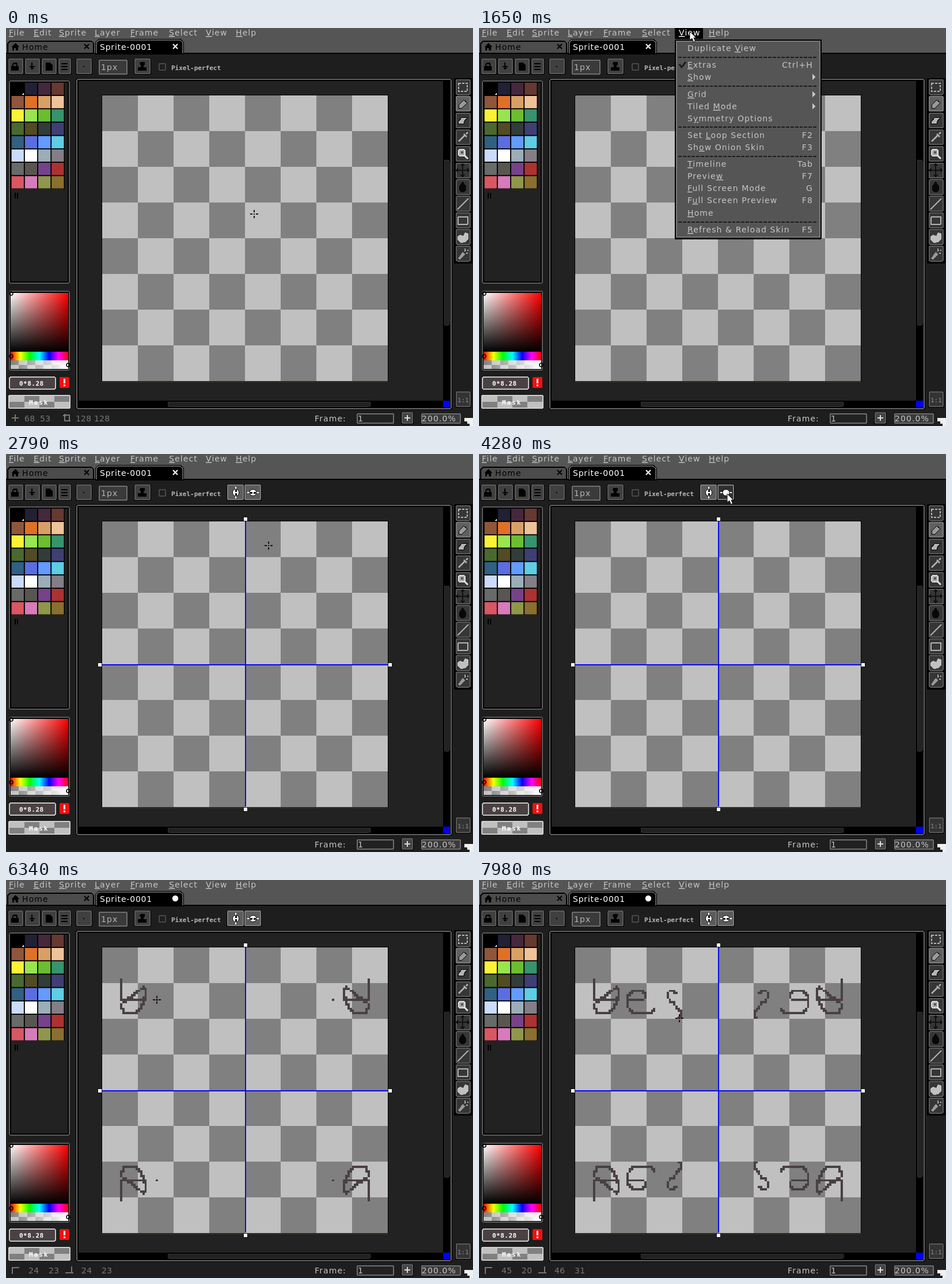
Recreate the animation shown at these times as an HTML page. Size 811x691 px, loop 8000 ms.

```html
<!DOCTYPE html>
<html lang="en">
<head>
<meta charset="utf-8">
<title>Pixel editor: symmetry drawing</title>
<style>
  html, body { margin: 0; width: 100%; height: 100%; overflow: hidden; background: #1e1e1e; }
  svg { display: block; width: 811px; height: 691px; shape-rendering: crispEdges; }
  text { font: 14px "DejaVu Sans", sans-serif; letter-spacing: 1.1px; fill: #c6c6c6; white-space: pre; }
  text.mini { font: bold 11px "DejaVu Sans Mono", monospace; letter-spacing: 0; }
  .smooth { shape-rendering: auto; }
</style>
</head>
<body>
<svg id="stage" viewBox="0 0 811 691">
  <defs>
    <linearGradient id="sat"><stop stop-color="#fff"/><stop offset="1" stop-color="#f00"/></linearGradient>
    <linearGradient id="val" x2="0" y2="1"><stop stop-opacity="0"/><stop offset="1"/></linearGradient>
    <linearGradient id="hue">
      <stop stop-color="#f00"/><stop offset=".167" stop-color="#ff0"/><stop offset=".333" stop-color="#0f0"/>
      <stop offset=".5" stop-color="#0ff"/><stop offset=".667" stop-color="#00f"/>
      <stop offset=".833" stop-color="#f0f"/><stop offset="1" stop-color="#f00"/>
    </linearGradient>
    <linearGradient id="alpha"><stop stop-color="#fff" stop-opacity="0"/><stop offset="1" stop-color="#fff"/></linearGradient>
    <path id="ink"/>
  </defs>
</svg>
<script>
const stage = document.getElementById('stage');
const ink = document.getElementById('ink');
const LOOP = 8000, CELL = 3.871, LEFT = 167, TOP = 117, SIZE = 128;
const LIGHT = '#c0c0c0', DARK = '#808080', EDGE = '#5a5a5a';
let layer = stage;

function el(tag, attrs) {
  const node = document.createElementNS('http://www.w3.org/2000/svg', tag);
  for (const k in attrs) node.setAttribute(k, attrs[k]);
  return layer.appendChild(node);
}
const rect = (x, y, width, height, fill, more) => el('rect', { x, y, width, height, fill, ...more });
const path = (d, stroke, more) => el('path', { d, stroke, fill: 'none', 'stroke-width': 2, ...more });
const shape = (d, fill, more) => el('path', { d, fill, ...more });
const circle = (cx, cy, r, fill, more) => el('circle', { cx, cy, r, fill, class: 'smooth', ...more });
// An underscore marks the mnemonic letter after it.
function label(x, y, str, fill = '#c6c6c6', more) {
  const node = el('text', { x, y, style: `fill:${fill}`, ...more });
  node.innerHTML = str.replace(/_(.)/, '<tspan text-decoration="underline">$1</tspan>');
  return node;
}
const mini = (x, y, str, fill, more) => label(x, y, str, fill, { class: 'mini', ...more });
function group(draw) {
  const parent = layer, g = el('g', {});
  layer = g;
  draw();
  layer = parent;
  return g;
}
const show = (node, on) => node.setAttribute('visibility', on ? 'visible' : 'hidden');
function button(x, y, w, h, face = '#404040', edge = EDGE) {
  rect(x, y, w, h, '#000', { rx: 3 });
  return rect(x + 2, y + 1, w - 4, h - 3, face, { rx: 2, stroke: edge, 'stroke-width': 2 });
}
function panel(x, y, w, h) {
  rect(x, y, w, h, '#222', { rx: 3, stroke: EDGE, 'stroke-width': 2 });
  rect(x + 2, y + 2, w - 4, h - 4, '#222', { stroke: '#000', 'stroke-width': 2 });
}
function checker(x, y, cols, rows, w, h, even = DARK, odd = LIGHT) {
  for (let i = 0; i < cols * rows; i++) {
    const c = i % cols, r = i / cols | 0;
    rect(x + c * w, y + r * h, w, h, (c + r) % 2 ? odd : even);
  }
}
const cross = (x, y, stroke) => path(`M${x - 4} ${y - 4}l8 8m0 -8l-8 8`, stroke, { class: 'smooth' });

// Menu bar and tabs
rect(0, 0, 811, 46, '#555');
rect(0, 43, 811, 648, '#1e1e1e');
path('M0 44H811', '#000');
const viewBox = rect(340, 0, 49, 19, '#000');
const menuBar = ['_File', 5, '_Edit', 48, '_Sprite', 92, '_Layer', 154, '_Frame', 216, '_Select', 283, '_View', 347, '_Help', 399];
let viewLabel;
for (let i = 0; i < menuBar.length; i += 2) {
  const node = label(menuBar[i + 1], 13, menuBar[i]);
  if (menuBar[i] === '_View') viewLabel = node;
}
shape('M2 44V27l4 -5H149l4 5V44z', '#000');
shape('M4 43V27l3 -3H148l3 3V43z', '#4c4c4c');
shape('M155 46V25l5 -6H303l6 6V46z', '#000');
path('M157 44V25l4 -4H302l5 4V44', EDGE);
rect(159, 24, 146, 22, '#000');
shape('M9 33l7 -7l7 7h-2v6h-4v-4h-3v4h-3v-6z', '#000');
label(28, 38, 'Home', '#000');
cross(140, 32, '#000');
label(163, 38, 'Sprite-0001', '#fff', { style: 'fill:#fff;letter-spacing:.8px' });
const closeMark = cross(294, 32, '#fff');
const dirtyMark = circle(294, 32, 5.2, '#fff');

// Context bar
[3, 32, 61, 90].forEach((x, i) => button(x, 53, i < 3 ? 28 : 24, 28));
shape('M9 66h2v-4l2 -2h5l2 2v4h2v8h-13z M13 66h5v-3h-5z', '#000', { 'fill-rule': 'evenodd' });
path('M45 60v12M41 67h9M43 70h5', '#000');
shape('M69 60h7l5 5v9h-12z', '#000');
path('M96 62h11M96 67h11M96 72h11', '#000');
button(121, 53, 29, 28);
rect(134, 66, 2, 2, '#000');
rect(162, 56, 48, 24, '#3a3a3a', { stroke: '#6e6e6e', 'stroke-width': 2, rx: 2 });
label(165, 73, '1px', '#b4b4b4');
button(222, 53, 30, 28);
shape('M233 59h8v4l-2 2v3h5v6h-15v-6h5v-3l-2 -2z', '#000');
const ppHover = rect(261, 52, 114, 31, '#5d3a30');
rect(266, 62, 11, 11, 'none', { stroke: '#484848', 'stroke-width': 2, rx: 2 });
mini(287, 73, 'Pixel-perfect', '#b8b8b8');

const symButtons = group(() => {
  button(383, 53, 31, 28, '#5c5c5c', '#7c7c7c');
  button(413, 53, 31, 28, '#5c5c5c', '#7c7c7c');
});
const symFaces = [symButtons.children[1], symButtons.children[3]];
layer = symButtons;
// Lens with an axis; the slot hides while the button is hovered.
function symIcon(cx, turn) {
  let slot;
  const icon = group(() => {
    path('M-10 0H10', '#fff');
    el('ellipse', { rx: 6, ry: 5.5, fill: '#fff', stroke: '#000', class: 'smooth' });
    slot = path('M-5 0H5', '#111', { 'stroke-width': 3, 'stroke-dasharray': '4 2' });
  });
  icon.setAttribute('transform', `translate(${cx} 67) rotate(${turn})`);
  return slot;
}
const slots = [symIcon(399, 90), symIcon(429, 0)];
layer = stage;

// Palette
panel(6, 92, 104, 351);
const palette = ('000000 222034 45283c 663931 8f563b df7126 d9a066 eec39a fbf236 99e550 6abe30 37946e ' +
  '4b692f 524b24 323c39 3f3f74 306082 5b6ee1 639bff 5fcde4 cbdbfc ffffff 9badb7 847e87 ' +
  '696a6a 595652 76428a ac3232 d95763 d77bba 8f974a 8a6f30').split(' ');
rect(8, 94, 94, 185, '#000');
palette.forEach((c, i) => rect(9.6 + i % 4 * 23.2, 94.8 + (i >> 2) * 23.2, 21.3, 21.3, '#' + c, { class: 'smooth' }));
shape('M31 112v4h-4z', '#fff');
path('M16 286v10M20 286v10', '#000');

// Colour picker
panel(6, 457, 104, 137);
rect(8, 460, 100, 102, 'url(#sat)');
rect(8, 460, 100, 102, 'url(#val)');
rect(8, 562, 100, 15, 'url(#hue)');
checker(8, 577, 7, 2, 14.28, 7.5);
rect(8, 577, 100, 15, 'url(#alpha)');
for (const [x, y] of [[9, 461], [9, 570], [108, 585]])
  circle(x, y, 3, 'none', { stroke: '#000', 'stroke-width': 1.5 });
rect(6, 606, 80, 21, '#4a4143', { rx: 3, stroke: '#c6c6c6', 'stroke-width': 2 });
mini(23, 621, '0*8.28', '#fff', { style: 'fill:#fff;letter-spacing:.5px' });
rect(93, 606, 17, 19, '#f01010', { rx: 3 });
path('M101.5 609v8M101.5 619v3', '#fff', { 'stroke-width': 3 });
rect(4, 637, 108, 24, LIGHT, { rx: 3 });
checker(6, 639, 4, 2, 26, 10, LIGHT, DARK);
rect(5, 638, 106, 22, 'none', { rx: 3, stroke: '#d0d0d0', 'stroke-width': 2 });
mini(40, 654, 'Mask', '#fff', { style: 'fill:#fff;letter-spacing:2px' });

// Editor
rect(121, 87, 654, 576, '#000', { rx: 4 });
rect(123, 89, 650, 572, '#222', { rx: 3, stroke: '#666', 'stroke-width': 2 });
rect(125, 91, 646, 568, '#222', { stroke: '#000', 'stroke-width': 2 });
rect(759, 92, 13, 555, '#000');
rect(125, 647, 634, 12, '#000');
rect(761, 229, 9, 287, '#222', { rx: 3, stroke: '#333' });
rect(281, 649, 352, 8, '#222', { rx: 3, stroke: '#333' });
rect(759, 647, 12, 11, '#00f');
rect(LEFT - 1, TOP - 1, 498, 497, '#000');
path('M167 614.5H663', '#383828', { 'stroke-width': 1 });
checker(LEFT, TOP, 8, 8, 61.94, 61.94);
for (const [sx, sy] of [[1, 1], [-1, 1], [1, -1], [-1, -1]])
  el('use', {
    href: '#ink', fill: '#484042',
    transform: `translate(${LEFT} ${TOP}) scale(${CELL}) translate(${sx < 0 ? SIZE : 0} ${sy < 0 ? SIZE : 0}) scale(${sx} ${sy})`
  });

function handle(x, y) {
  rect(x - 4, y - 4, 8, 8, '#111');
  rect(x - 3, y - 3, 6, 6, '#fff');
}
const axisV = group(() => { rect(415, 117, 2, 495, '#0808f0'); handle(416, 113); handle(416, 617); });
const axisH = group(() => { rect(167, 365, 496, 2, '#0808f0'); handle(163, 366); handle(667, 366); });

// Tool column
rect(778, 87, 32, 322, '#000', { rx: 3 });
for (let i = 0; i < 11; i++) button(780, 89 + i * 28.9, 28, 28.5, i === 1 ? '#606060' : '#363636', i === 1 ? '#7a7a7a' : EDGE);
const GREY = '#b4b4b4';
rect(786, 96, 15, 14, 'none', { stroke: GREY, 'stroke-width': 2, 'stroke-dasharray': '4 2' });
shape('M786 139v-5l9 -9l6 5l-9 9z', '#999', { stroke: '#000' });
shape('M785 163l7 -8h10l-7 8v3h-10z', GREY, { stroke: '#000' });
path('M786 197l10 -10m-1 -3l5 5m-1 -5l3 -3', GREY, { class: 'smooth', 'stroke-width': 2.5 });
rect(786, 211, 11, 11, '#aaa', { rx: 3, stroke: '#e0e0e0', 'stroke-width': 2 });
rect(790, 214, 4, 4, '#555');
path('M796 221l6 6', '#e0e0e0', { class: 'smooth', 'stroke-width': 3 });
path('M793 236v22M782 247h22M790 239l3 -3l3 3M790 255l3 3l3 -3M785 244l-3 3l3 3M801 244l3 3l-3 3', '#111');
shape('M793 266l6 9v6l-3 4h-6l-3 -4v-6z', '#080808');
path('M784 315L803 296', GREY, { class: 'smooth' });
rect(785, 328, 17, 13, 'none', { stroke: GREY, 'stroke-width': 2, rx: 1 });
shape('M784 362l5 -3l5 2l3 -6l6 2v9l-5 6l-9 1l-5 -5z', LIGHT);
shape('M785 400l8 -11l4 4l-9 9z', '#999');
path('M796 388l2 -2M799 391h3M797 383v2M801 386h2', GREY);
button(780, 631, 28, 28, '#333');
mini(784, 650, '1:1', '#707070');

// Status bar
label(536, 683, 'Frame:');
rect(610, 670, 63, 16, '#222', { stroke: '#6e6e6e', 'stroke-width': 2, rx: 2 });
label(611, 683, '1');
button(686, 667, 22, 21, '#444');
path('M697 672v10M692 677h10', '#ddd');
rect(722, 670, 67, 16, '#3a3a3a', { stroke: '#6e6e6e', 'stroke-width': 2, rx: 2 });
label(722, 683, '200.0%');
shape('M796 677h15v14h-6v-4h-4v-4h-5z', '#f0f0f0');
const GRAY = '#777';
const hoverStatus = group(() => {
  path('M16 671v12M10 677h12', GRAY);
  path('M102 671v11h10M99 674l3 -3l3 3M104 672h6v10', GRAY);
  label(121, 683, '128', GRAY, { style: `fill:${GRAY};letter-spacing:.2px` });
  label(153, 683, '128', GRAY, { style: `fill:${GRAY};letter-spacing:.2px` });
});
const dragStatus = group(() => {
  path('M10 673h13M11 672v12', GRAY);
  path('M103 682h14M114 671v12', GRAY);
});
const coords = [0, 1, 2, 3].map(() => label(0, 683, '', GRAY, { style: `fill:${GRAY};letter-spacing:.4px` }));

// Popup menu: text, centre line, shortcut (> opens a submenu)
const items = [
  ['Duplicate _View', 35], ['_Extras', 64, 'Ctrl+H'], ['_Show', 85, '>'], ['_Grid', 115, '>'],
  ['Tiled _Mode', 136, '>'], ['S_ymmetry Options', 157], ['Set _Loop Section', 186, 'F2'],
  ['Sh_ow Onion Skin', 207, 'F3'], ['_Timeline', 236, 'Tab'], ['Previe_w', 257, 'F7'],
  ['_Full Screen Mode', 278, 'G'], ['F_ull Screen Preview', 299, 'F8'], ['_Home', 321],
  ['_Refresh &amp; Reload Skin', 350, 'F5']
];
let rows;
const popup = group(() => {
  rect(340, 20, 255, 347, '#000', { rx: 2 });
  rect(343, 23, 249, 340, '#555', { stroke: '#787878', 'stroke-width': 2 });
  for (const y of [51, 101, 172, 223, 337]) path(`M346 ${y}H588`, '#1c1c1c', { 'stroke-dasharray': '5.8 2' });
  rows = items.map(([name, y, key]) => {
    const back = rect(345, y - 10, 244, 21, '#1e1e1e');
    const texts = [label(362, y + 5, name)];
    if (key === '>') shape(`M579 ${y - 5}l6 5l-6 5z`, '#c6c6c6');
    else if (key) texts.push(label(580, y + 5, key, '#c6c6c6', { 'text-anchor': 'end' }));
    return { y, back, texts };
  });
  path('M348 63l4 5l7 -9', '#1c1c1c', { 'stroke-width': 3 });
});

// Pointers
const arrow = shape('M0 0V15L4 12L6.5 18.5L9.5 17L7 11H11Z', '#fff', { stroke: '#111', class: 'smooth' });
const aim = shape('M-7 -1h4v2h-4zM3 -1h4v2h-4zM-1 -7h2v4h-2zM-1 3h2v4h-2zM-1 -1h2v2h-2z', '#141414');

// Pointer path: time, x, y
const approach = [
  [0, 431, 323], [550, 431, 323], [740, 372, 180], [960, 294, 49], [1120, 322, 24], [1290, 366, 6],
  [1650, 366, 6], [1790, 392, 105], [1930, 421, 230], [2000, 421, 230], [2090, 427, 234], [2380, 456, 159],
  [2910, 456, 159], [3260, 440, 118], [3590, 399, 68], [3900, 399, 69], [4060, 430, 69], [4280, 431, 69],
  [4430, 431, 69], [4780, 305, 125], [5090, 201, 174]
];
const letterY = [
  [5150, 201, 174], [5240, 201, 187], [5360, 201, 206], [5450, 208, 208], [5540, 224, 198], [5620, 240, 186],
  [5700, 240, 207], [5760, 234, 221], [5810, 224, 231], [5870, 209, 232], [5920, 201, 223], [5960, 202, 214],
  [5990, 212, 209], [6030, 242, 209], [6080, 242, 209]
];
const letterE = [
  [6310, 261.8, 208], [6400, 261.8, 208], [6520, 276, 208], [6620, 286, 207], [6690, 289, 200], [6740, 283, 194],
  [6790, 269, 193], [6830, 261, 198], [6870, 258.4, 205], [6960, 258, 216], [7030, 262, 225], [7100, 271, 231],
  [7200, 287, 232], [7280, 299, 231], [7340, 305, 224], [7360, 305, 224]
];
const letterS = [
  [7490, 343, 196], [7510, 343, 196], [7570, 337, 192.5], [7620, 330, 194], [7660, 327.5, 199], [7710, 330, 207],
  [7780, 338, 214], [7850, 345, 222], [7910, 350, 231], [7950, 350, 236], [7980, 347.5, 239.5], [LOOP, 347.5, 239.5]
];
const track = [...approach, ...letterY, ...letterE, ...letterS];
const strokes = [[5150, 6080], [6320, 7350], [7510, LOOP]];

const same = (a, b) => a[1] === b[1] && a[2] === b[2];
function slope(i, k) {
  const a = track[i - 1], p = track[i], b = track[i + 1];
  return !a || !b || same(a, p) || same(p, b) ? 0 : (b[k] - a[k]) / (b[0] - a[0]);
}
function pointer(t) {
  let i = 0;
  while (i < track.length - 2 && track[i + 1][0] <= t) i++;
  const a = track[i], b = track[i + 1], d = b[0] - a[0], u = (t - a[0]) / d, v = 1 - u;
  return [1, 2].map(k =>
    a[k] * v * v * (1 + 2 * u) + b[k] * u * u * (3 - 2 * u) + d * u * v * (slope(i, k) * v - slope(i + 1, k) * u));
}
const toCell = ([x, y]) => [Math.floor((x - LEFT) / CELL), Math.floor((y - TOP) / CELL)];
const inside = ([x, y], x0, y0, x1, y1) => x >= x0 && x < x1 && y >= y0 && y < y1;
const during = (t, a, b) => t >= a && t < b;

function drawInk(t) {
  const cells = new Set();
  for (const [from, to] of strokes)
    for (let s = from; s <= Math.min(t, to); s += 4) cells.add(toCell(pointer(s)).join(' '));
  ink.setAttribute('d', [...cells].map(c => `M${c}h1v1h-1z`).join(''));
}

function drawStatus(t, p) {
  const stroke = strokes.find(([a, b]) => during(t, a, b));
  const over = !stroke && inside(p, LEFT, TOP, 663, 612) && !during(t, 1290, 2910);
  show(hoverStatus, over);
  show(dragStatus, stroke);
  const values = stroke ? [...toCell(pointer(stroke[0])), ...toCell(p)] : over ? toCell(p) : [];
  const xs = stroke ? [39, 74, 131, 166] : [32, 59];
  coords.forEach((node, i) => {
    node.textContent = values[i] ?? '';
    node.setAttribute('x', xs[i] ?? 0);
  });
}

function render(t) {
  const p = pointer(t), open = during(t, 1440, 2790), symmetry = t >= 2790;
  const crosshair = !open && inside(p, 125, 92, 758, 646);
  show(arrow, !crosshair);
  show(aim, crosshair);
  (crosshair ? aim : arrow).setAttribute('transform', `translate(${p[0].toFixed(2)} ${p[1].toFixed(2)})`);

  const viewHot = open || inside(p, 340, 0, 389, 19);
  show(viewBox, viewHot);
  viewBox.setAttribute('fill', open ? '#000' : '#222');
  viewLabel.style.fill = viewHot ? '#fff' : '#c6c6c6';
  show(ppHover, !open && inside(p, 261, 46, 375, 83));

  show(popup, open);
  for (const { y, back, texts } of rows) {
    const hot = open && inside(p, 345, y - 10, 589, y + 11);
    show(back, hot);
    for (const node of texts) node.style.fill = hot ? '#fff' : '#c6c6c6';
  }

  show(symButtons, symmetry);
  symFaces.forEach((face, i) => {
    const hot = inside(p, 384 + i * 30, 54, 414 + i * 30, 81);
    face.setAttribute('fill', hot ? '#303030' : '#5c5c5c');
    show(slots[i], symmetry && !hot);
  });
  show(axisV, symmetry && !during(t, 3680, 3860));
  show(axisH, symmetry && !during(t, 4090, 4260));

  show(closeMark, t < 6080);
  show(dirtyMark, t >= 6080);
  drawInk(t);
  drawStatus(t, p);
}

const start = performance.now();
function tick() {
  render((performance.now() - start) % LOOP);
  requestAnimationFrame(tick);
}
tick();
</script>
</body>
</html>
```
